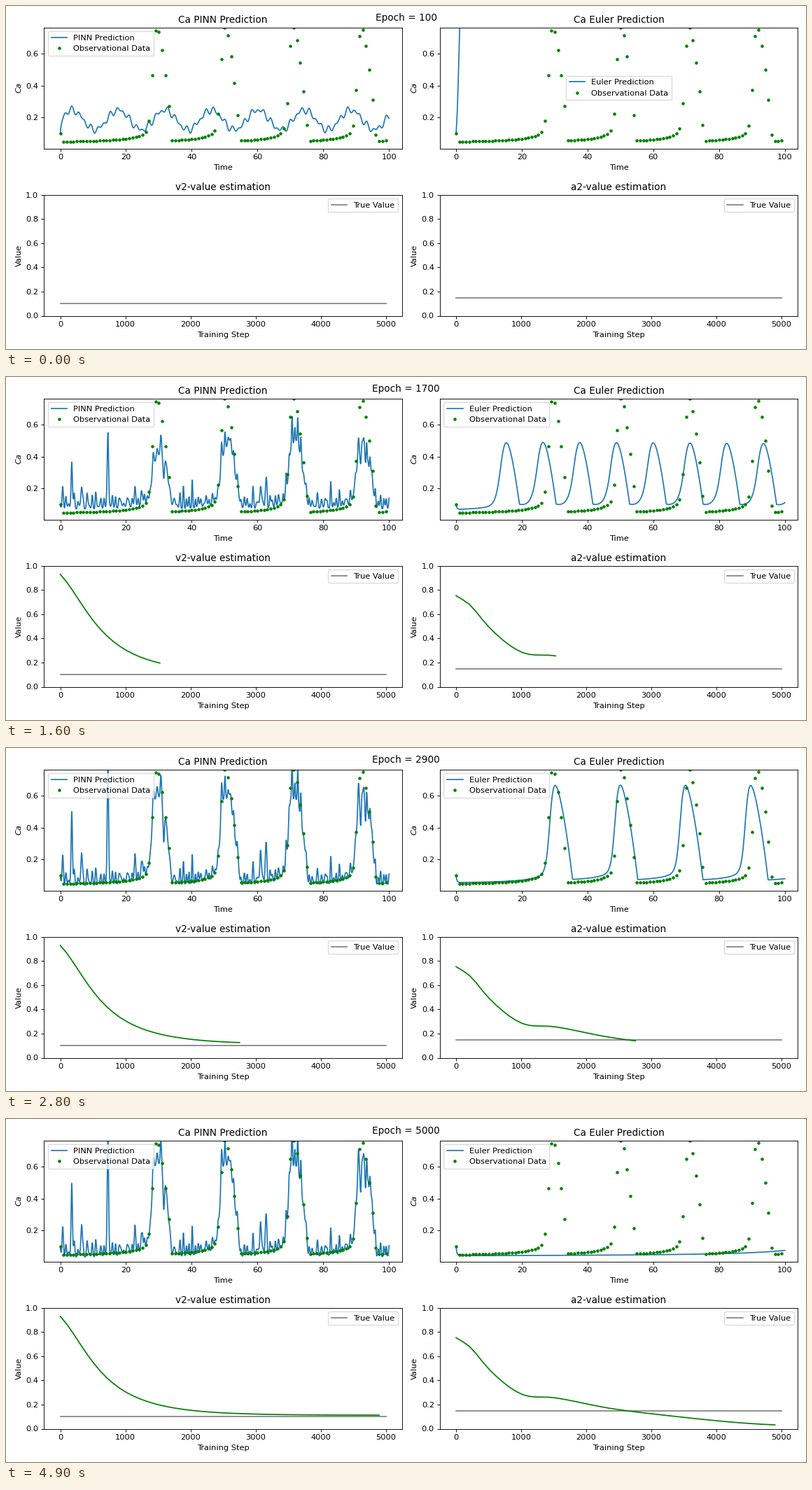
A matplotlib script that plays this animation: 1143x490 px, repeating every 5 s.

```python
import numpy as np
import matplotlib.pyplot as plt
from matplotlib.animation import FuncAnimation

W, H = 1143, 490
DPI = W / 14
FRAMES, INTERVAL = 50, 100
t = np.linspace(0, 100, 1001)
steps = np.linspace(0, 5000, FRAMES)


def sigmoid(x):
    return 1 / (1 + np.exp(-np.clip(x, -40, 40)))


def spline(x, xs, ys):
    """Cubic Hermite curve through a few points."""
    xs, ys = np.asarray(xs, float), np.asarray(ys, float)
    m = np.gradient(ys, xs)
    i = np.clip(np.searchsorted(xs, x) - 1, 0, len(xs) - 2)
    h = xs[i + 1] - xs[i]
    s = (x - xs[i]) / h
    return ((1 + 2 * s) * (1 - s) ** 2 * ys[i] + s * (1 - s) ** 2 * h * m[i]
            + s * s * (3 - 2 * s) * ys[i + 1] + s * s * (s - 1) * h * m[i + 1])


def from_start(x, y, tau):
    """Make a curve leave the common initial value of 0.1."""
    return y + (.1 - y[0]) * np.exp(-x / tau)


def pulse_train(x, onset, period, height, length, width, base, creep):
    """Slow recovery, steep rise and curved fall, repeated every period."""
    y = np.full_like(x, base)
    for c in np.arange(onset, 100 + 2 * period, period):
        s = sigmoid((x - c) / width)
        fall = 1 - np.clip((x - c) / length, 0, 1) ** 1.75
        wait = np.maximum(c - x, 0) / period
        y += height * s * fall + creep * (1 - s) / (1 + 5 * wait) ** 1.5
    return y


def observed(x):
    return from_start(x, pulse_train(x, 28.1, 20.74, .81, 5.85, .45, .037, .1), .25)


# Parameter estimates over the training steps
u = steps / 1000
v2 = .112 + .816 * np.exp(-u * (1.5 - .8 * np.exp(-(u / .45) ** 1.2)))
a2 = spline(steps, [0, 200, 500, 1000, 1500, 2350, 3265, 4900, 5000],
            [.752, .682, .495, .287, .257, .17, .108, .032, .03])

# Network prediction: slow wave -> noisy bumps -> fitted spikes
rng = np.random.default_rng(4)
freqs = rng.uniform(.35, 1.2, 16)
phases = rng.uniform(0, 2 * np.pi, 16)
noise = np.sin(2 * np.pi * np.outer(t, freqs) + phases).sum(axis=1) / np.sqrt(8)
wave = (.062 * np.cos(2 * np.pi * (t - 3.5) / 14.15)
        + .013 * np.cos(2 * np.pi * t / 1.95 + 1.2)
        + .012 * np.sin(2 * np.pi * t / 2.9 + .4))
bumps = sum(a * np.exp(-((t - 31.2 - 20.25 * i) / 2.2) ** 2)
            for i, a in enumerate([.16, .3, .36, .26]))
fit = np.minimum(observed(t), .66)
NEEDLES = [(.8, .13), (3.5, .44), (6.5, .17), (14.5, .73), (22.7, .12), (25, .1),
           (31.5, -.18), (60.9, .19), (62.5, .2), (91.4, -.18), (92.9, -.18)]
needles = sum(a * np.exp(-.5 * ((t - c) / .2) ** 2) for c, a in NEEDLES)


def pinn(k):
    learned = np.interp(k, [12, 19, 33], [0, .82, .97])
    early = np.interp(k, [1, 12, 19], [0, 1, 0])
    base = np.interp(k, [0, 12, 19, 33], [.185, .14, .04, .02])
    rough = .027 * min(k / 12, 1) * (1 + learned * fit)
    sharp = np.clip((k - 5) / 16, 0, 1) ** 1.3
    y = (base + learned * fit + early * bumps + max(0, 1 - k / 14) * wave
         + rough * (noise + .25 * (noise ** 2 - 1)) + sharp * needles)
    return from_start(t, y, .4)


# Integrated model: settling oscillation, then a relaxation pulse train
def settling(k, first, period):
    s = sigmoid((t - .77 * first) / (.3 + .05 * k))
    late = t - first
    decay = max(0, .42 - .026 * k)
    ring = np.exp(-decay * np.maximum(late, -4)) * np.cos(2 * np.pi * late / period)
    return s * (.085 + .92 * v2[k] + .135 * ring) + (1 - s) * .082


def relaxing(first, period):
    onset = first - 1.5 - .01 * period
    y = pulse_train(t, onset, period, height=.89 - 4.1 / period,
                    length=3.7 + .16 * period, width=.35 + 4.5 / period,
                    base=.033 + .25 / period, creep=.09)
    return y + .012 * sigmoid(t - onset)


def euler(k):
    first = np.exp(np.interp(k, [0, 12, 19, 24, 33, 41, 49],
                             np.log([1.1, 12.7, 17.75, 24.7, 39, 68.5, 114])))
    period = max(10.8, 12.62 * (first / 17.75) ** .847)
    mix = np.clip((k - 12.5) / 4, 0, 1)
    y = (1 - mix) * settling(k, first, period) + mix * relaxing(first, period)
    return from_start(t, y, .25)


def legend_place(k):
    if k < 7:
        return "center"
    return "center left" if 22 <= k <= 25 else "upper left"


# Figure
fig = plt.figure(figsize=(W / DPI, H / DPI), dpi=DPI)


def panel(x, y, title, xlabel, ylabel):
    ax = fig.add_axes([x / W, 1 - (y + 173) / H, 511.5 / W, 173 / H])
    ax.set_title(title)
    ax.set_xlabel(xlabel)
    ax.set_ylabel(ylabel)
    return ax


def trace_panel(x, title, label):
    ax = panel(x, 30.5, title, "Time", "$Ca$")
    line, = ax.plot([], [], color="C0", label=label)
    days = np.arange(100.)
    ax.plot(days, observed(days), "g.", label="Observational Data")
    ax.set_xlim(-4.95, 103.95)
    ax.set_ylim(.005, .767)
    return line, ax.legend(loc="upper left")


def value_panel(x, title, truth):
    ax = panel(x, 269.5, title, "Training Step", "Value")
    ax.plot([0, 5000], [truth, truth], color="gray", label="True Value")
    line, = ax.plot([], [], color="green")
    ax.set_xlim(-250, 5250)
    ax.set_ylim(0, 1)
    ax.legend(loc="upper right")
    return line


pinn_line, _ = trace_panel(54.3, "Ca PINN Prediction", "PINN Prediction")
euler_line, euler_legend = trace_panel(619.8, "Ca Euler Prediction", "Euler Prediction")
v2_line = value_panel(54.3, "v2-value estimation", .1)
a2_line = value_panel(619.8, "a2-value estimation", .15)
heading = fig.suptitle("Epoch = 100")


def draw(k):
    heading.set_text(f"Epoch = {100 * (k + 1)}")
    pinn_line.set_data(t, pinn(k))
    euler_line.set_data(t, euler(k))
    euler_legend.set_loc(legend_place(k))
    v2_line.set_data(steps[:k], v2[:k])
    a2_line.set_data(steps[:k], a2[:k])
    return pinn_line, euler_line, v2_line, a2_line


anim = FuncAnimation(fig, draw, frames=FRAMES, interval=INTERVAL, repeat=True)
plt.show()
```
